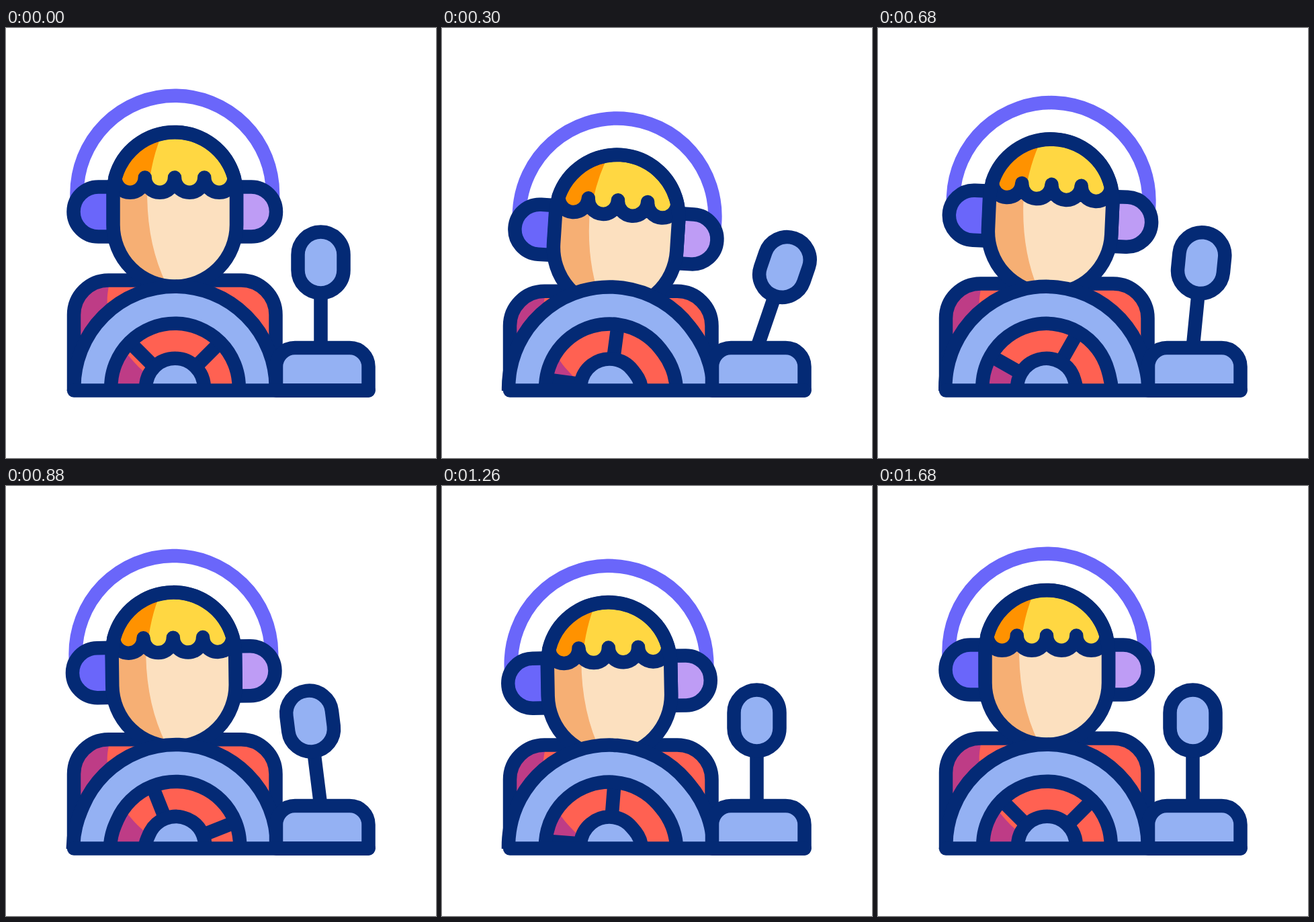
Recreate the animation shown at these times as an HTML page. Size 640 by 640 pixels, loop 1860 ms.

```html
<!DOCTYPE html>
<html lang="en">
<head>
<meta charset="utf-8">
<title>Driver</title>
<style>
  html, body { margin: 0; height: 100%; overflow: hidden; background: #fff; }
  svg { display: block; width: 100%; height: 100%; }
  .line { stroke: #042a75; stroke-width: 20.5; stroke-linecap: round; stroke-linejoin: round; }
  .blue { fill: #94b1f3; }
  .none { fill: none; }
</style>
</head>
<body>
<svg viewBox="0 0 640 640">
  <defs>
    <clipPath id="aboveFloor"><path d="M0 0H640V540H0Z"/></clipPath>
    <clipPath id="hairShape"><path id="hair" d="M162.5 222.5a22.1 22.1 0 0 0 44.25 0a22.1 22.1 0 0 0 44.25 0a22.1 22.1 0 0 0 44.25 0a22.1 22.1 0 0 0 44.25 0A91.75 91.75 0 0 0 162.5 222.5Z"/></clipPath>
    <clipPath id="faceShape"><path id="face" d="M159.5 247a91.75 91.75 0 0 1 183.5 0V293a91.75 91.75 0 0 1-183.5 0Z"/></clipPath>
    <clipPath id="bodyShape"><path id="torso" d="M101 600V427a51.5 51.5 0 0 1 51.5-51.5H350a51.5 51.5 0 0 1 51.5 51.5V600Z"/></clipPath>
  </defs>

  <g clip-path="url(#aboveFloor)">
    <g id="body">
      <use href="#torso" fill="#ff6152"/>
      <path clip-path="url(#bodyShape)" fill="#be3c86" d="M90 365H156L153 385C143 430 165 480 215 520V600H90Z"/>
      <use href="#torso" class="line none"/>
    </g>

    <g id="head">
      <path class="none" stroke="#6a66fa" stroke-width="20.5" d="M105.5 254V246.5a145.75 145.75 0 0 1 291.5 0V254"/>
      <path class="line" fill="#6a66fa" d="M160 236.5H137.5a37 37 0 0 0 0 74H160Z"/>
      <path class="line" fill="#be9cf5" d="M343 236.5H365a37 37 0 0 1 0 74H343Z"/>
      <use href="#face" fill="#fce0bf"/>
      <path clip-path="url(#faceShape)" fill="#f6af74" d="M150 230H210.500Q207 315 238 380V390H150Z"/>
      <use href="#hair" fill="#ffd742"/>
      <path clip-path="url(#hairShape)" fill="#ff9200" d="M150 150H236Q216 190 211 250H150Z"/>
      <use href="#hair" class="line none"/>
      <use href="#face" class="line none"/>
    </g>

    <g id="wheel"></g>
  </g>

  <g id="lever">
    <path class="line" d="M468.500 477V400"/>
    <rect class="line blue" x="434.500" y="303.500" width="68" height="91" rx="34"/>
  </g>
  <path class="line blue" d="M402 539.500V504a28 28 0 0 1 28-28H511.500a28 28 0 0 1 28 28V539.500Z"/>
  <path class="line" d="M101 539.500H539.500"/>
</svg>

<script>
const LOOP = 1860, STEP = 20;
const part = id => document.getElementById(id);
const [body, head, wheel, lever] = ["body", "head", "wheel", "lever"].map(part);

// The rim is slightly taller than wide, which shows as it turns.
const ring = (r, attrs) =>
  `<rect x="${-r}" y="${-r - 3.5}" width="${2 * r}" height="${2 * r + 7}" rx="${r}" ${attrs}/>`;

wheel.innerHTML =
  ring(122.5, 'class="none" stroke="#94b1f3" stroke-width="37"') +
  '<path class="line" d="M33 -36.5L67 -70.5M-33 -36.5L-67 -70.5M33 36.5L67 70.5M-33 36.5L-67 70.5"/>' +
  ring(150.25, 'class="line none"') +
  ring(95.25, 'class="line none"') +
  ring(43.25, 'class="line blue"');

// Keys are [time, value] pairs joined by ease-in-out.
function track(keys, t) {
  const next = keys.findIndex(k => k[0] > t);
  if (next === 0) return keys[0][1];
  if (next < 0) return keys[keys.length - 1][1];
  const [t0, a] = keys[next - 1], [t1, b] = keys[next];
  const x = (t - t0) / (t1 - t0);
  return a + (b - a) * x * x * (3 - 2 * x);
}

const bob = [[0, 0], [20, 0], [440, 45], [787, 0], [1160, 20.3], [1640, 0]];
const sink = [[0, 0], [20, 0], [440, 22], [787, 0], [1160, 11.3], [1640, 0]];
const lean = [[0, 0], [20, 0], [440, 5], [1030, -1.85], [1550, 0]];
const steer = [[0, 0], [20, 0], [520, -63.5], [830, 28.3], [1150, -46.5], [1640, 0]];
const shift = [[0, 0], [20, 0], [440, 25.5], [860, -7.2], [1245, 0]];

function draw() {
  const t = Math.floor(performance.now() / STEP) * STEP % LOOP;
  const set = (el, value) => el.setAttribute("transform", value);
  set(body, `translate(0 ${track(sink, t)})`);
  set(head, `translate(0 ${track(bob, t)}) rotate(${track(lean, t)} 251 392)`);
  set(wheel, `translate(251.5 538.5) rotate(${track(steer, t)})`);
  set(lever, `rotate(${track(shift, t)} 468.5 477)`);
  requestAnimationFrame(draw);
}
draw();
</script>
</body>
</html>
```
